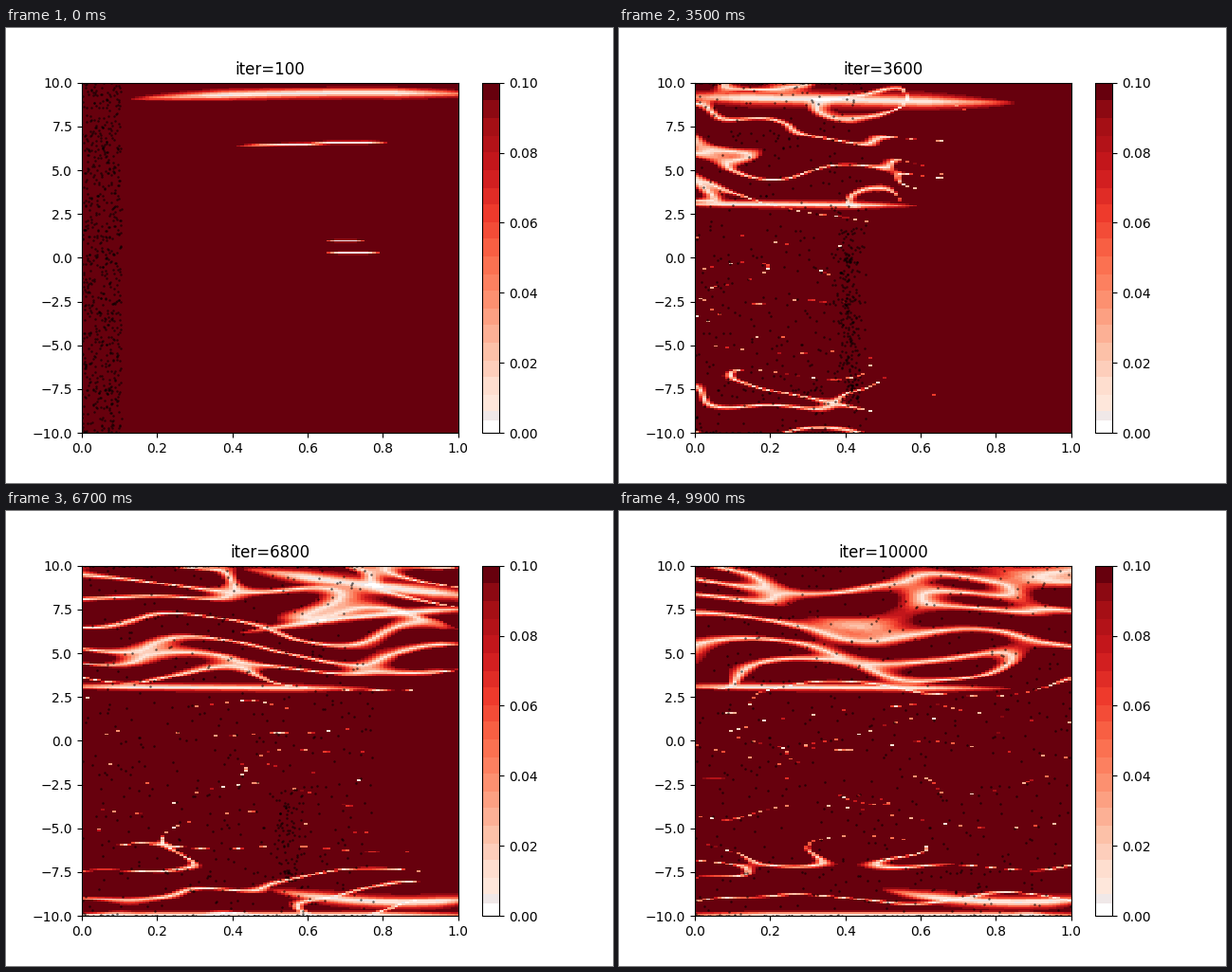
A matplotlib script that plays this animation: 640 by 480 pixels, repeating every 10 s.

```python
import numpy as np
import matplotlib.pyplot as plt
from matplotlib.animation import FuncAnimation
from matplotlib.colors import ListedColormap

FRAMES, NX, NY = 100, 100, 200
WAVES, DOTS = 16, 700
X, Y = np.meshgrid((np.arange(NX) + .5) / NX, (np.arange(NY) + .5) / NY * 20 - 10)
rng = np.random.default_rng(4)


def banded_reds():
    """Reds in flat bands, white at the very bottom."""
    edges = np.r_[0, 9, np.linspace(16, 243, 19), 256].astype(int)
    reds = plt.get_cmap('Reds')(np.arange(256))
    for lo, hi in zip(edges[:-1], edges[1:]):
        reds[lo:hi] = reds[(lo + hi) // 2].copy()
    reds[:9, :3] = 1
    reds[9:16, :3] = .94, .91, .91
    reds[243:, :3] = 103 / 255, 0, 13 / 255
    return ListedColormap(reds)


def sigmoid(z):
    return 1 / (1 + np.exp(-z))


def front(t):
    """Where the wall of points stands."""
    return .1 + .52 * np.tanh(t / 48)


# Random waves, long in x and short in y; their zero lines glow.
kx, drift = rng.normal(0, 6, WAVES), rng.normal(0, .07, WAVES)
ky, phase = rng.uniform(.8, 3.2, WAVES), rng.uniform(0, 2 * np.pi, WAVES)
TOP = sigmoid((Y - 2.9) / .35)
BOTTOM = sigmoid((-6.4 - Y) / .5)


def ripples(t):
    x = X * .6 / front(t)
    y = Y + .35 * np.sin(9 * x + .8 * Y + .05 * t)
    g = sum(np.cos(a * x + b * y + p + w * t)
            for a, b, p, w in zip(kx, ky, phase, drift)) / np.sqrt(WAVES / 2)
    reach = t / (95 - 25 * TOP - 15 * BOTTOM)
    late = .5 * np.clip((t - 80) / 19, 0, 1)
    sharp = 3.8 - (2.9 + late) * TOP - 2.6 * BOTTOM + 25 * np.maximum(X - reach, 0)
    return .93 * min(t / 8, 1) * np.clip(1 - np.abs(g) * np.exp(sharp), 0, 1)


def streak(t, on, off, w, x0, x1, y0, y1, sag=0):
    """Tapered bright arc that lives from on to off."""
    life = np.clip(min(t - on, off - t) / 7, 0, 1)
    u = (X - x0) / (x1 - x0)
    env = life * np.sqrt(np.clip(4 * np.minimum(u, 1 - u), 0, 1))
    mid = y0 + (y1 - y0) * u + 4 * sag * u * (1 - u)
    return .95 * env * np.exp(-((Y - mid) / (w * env + .02)) ** 2)


def arcs(t):
    yield streak(t, -9, 22, .2, .13, 1.08, 9.05, 9.28, .2)
    yield streak(t, -9, 14, .05, .41, .66, 6.37, 6.5)
    yield streak(t, -9, 14, .05, .61, .81, 6.55, 6.57)
    yield streak(t, -9, 8, .04, .65, .75, .95, .95)
    yield streak(t, -9, 8, .04, .65, .79, .25, .25)
    # shelf and floor stay, the others come and go
    yield streak(t, 15, 120, .15, -.1, 1.4 * front(t), 3.1, 2.95)
    yield streak(t, 35, 120, .1, -.1, 1.1, -9.93, -9.93)
    yield streak(t, 12, 56, .3, -.1, .85, 9.2, 8.8)
    yield streak(t, 38, 66, .2, -.1, .68, 6.1, 3.9, .2)
    yield streak(t, 48, 95, .15, .42, 1.08, 6.1, 7.5, .3)
    yield streak(t, 48, 92, .3, .43, 1.1, 9.8, 8.1, -.1)
    yield streak(t, 60, 120, .25, .5, 1.1, -8.5, -8.9, -.5)
    for side in -.9, .9:
        yield streak(t, 72, 92, .22, .31, .63, -7.8, -7.7, side)


def residual(t):
    dark = 1 - ripples(t)
    for light in arcs(t):
        dark = dark * (1 - light)
    return .1 * dark


rx, ry, rank, edge = rng.random((4, DOTS))
ry = 20 * ry - 10
noise = rng.normal(0, .016, DOTS)


def share(order, part):
    """Weight 1 for the given part of the dots, with a soft limit."""
    return np.clip((part - order) * 15, 0, 1)


def points(t):
    held = share(rank, .55 * (1 - np.exp(-t / 6)) * np.exp(-(t / 60) ** 2))
    stuck = share(edge, .4 * (1 - np.exp(-t / 30))) * (1 - held)
    crowd = -5.5 * np.sin(np.pi * t / 125) ** 2 + ry * np.exp(-t / 50)
    y = ry + held * (crowd - ry)
    y += stuck * (np.sign(ry) * 9.97 - y)
    x = rx * min(.105 + t / 100, 1)
    wall = front(t) - .02 + .0003 * (y + 1) ** 2 + noise
    x += held * (wall - x)
    return np.c_[np.clip(x, 0, 1), y]


fig, ax = plt.subplots(figsize=(6.4, 4.8), dpi=100)
image = ax.imshow(residual(0), cmap=banded_reds(), vmin=0, vmax=.1, origin='lower',
                  extent=(0, 1, -10, 10), aspect='auto', interpolation='nearest')
fig.colorbar(image, ax=ax, ticks=np.arange(6) * .02)
dots = ax.scatter(rx, ry, s=3.2, c='black', alpha=.6, linewidths=0)
ax.set(xlim=(0, 1), ylim=(-10, 10))
title = ax.set_title('iter=100')


def draw(i):
    image.set_data(residual(i))
    dots.set_offsets(points(i))
    title.set_text(f'iter={100 * (i + 1)}')
    return image, dots, title


anim = FuncAnimation(fig, draw, frames=FRAMES, interval=100, repeat=True)
plt.show()
```
